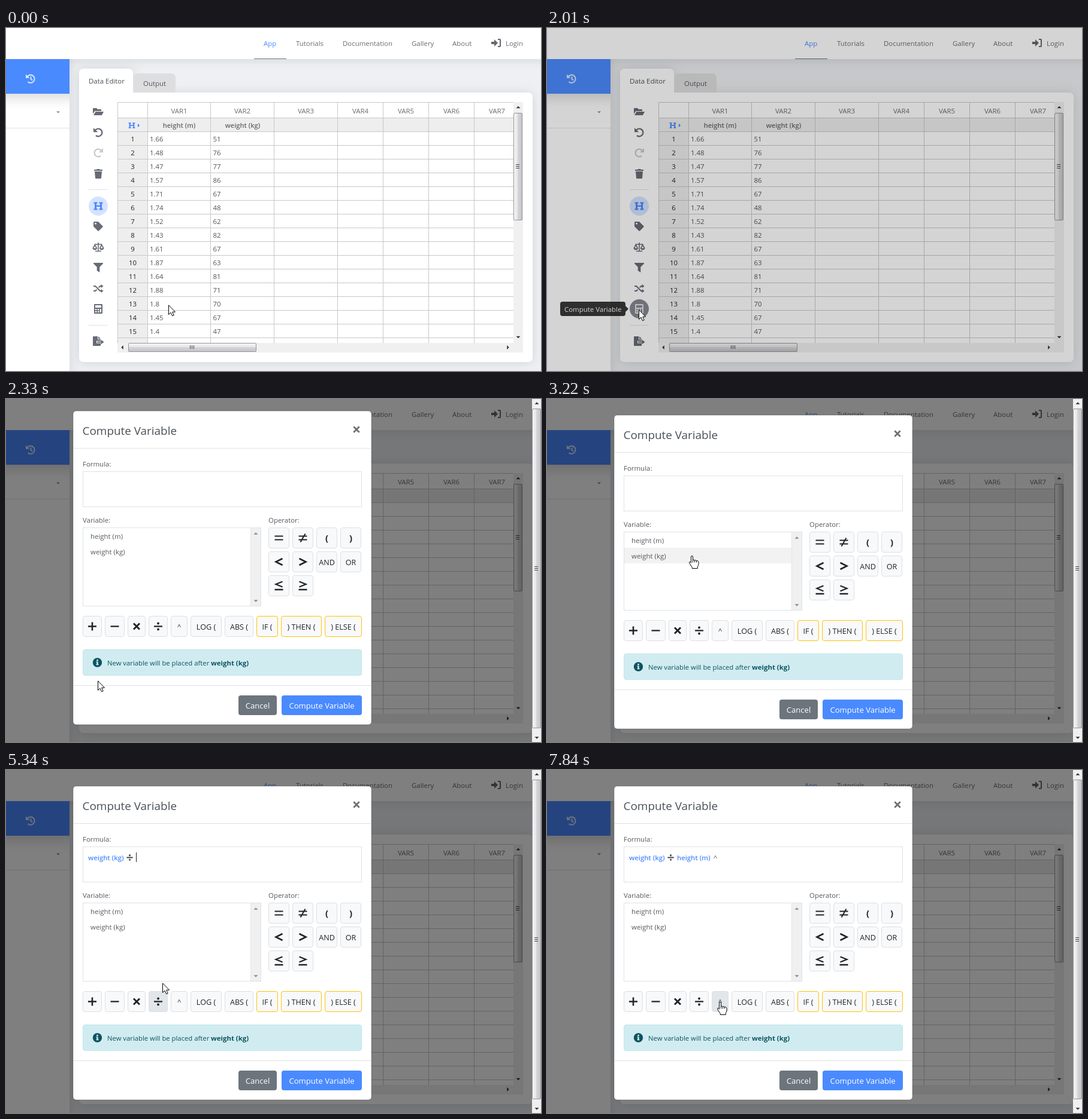
Animation of 893x574 px, one loop 8000 ms. Source, as an HTML page:

```html
<!DOCTYPE html>
<html lang="en">
<head>
<meta charset="utf-8">
<title>Compute Variable</title>
<style>
html, body { margin: 0; width: 100%; height: 100%; overflow: hidden; background: #eef0f2; }
svg { display: block; width: 100%; height: 100%; }
text { font-family: "Open Sans", "Noto Sans", sans-serif; font-size: 11.45px; white-space: pre; }
.crisp { shape-rendering: crispEdges; }
.soft { filter: drop-shadow(0 1px 9px rgba(30, 40, 60, .13)); }

/* 8 s loop: 1% = 80 ms */
.a { animation: 8s step-end infinite; }
#cursor { animation-name: move; }
#hand { animation-name: hand; }
#arrow { animation-name: arrow; }
#click { animation-name: click; }
#tip { animation-name: tip; }
#calc { animation-name: calc; }
#shade { animation-name: shade; }
#modal { animation-name: show; }
#dialog { animation-name: drop; }
#caret { animation-name: caret; }
#tok0 { animation-name: tok0; }
#tok1 { animation-name: tok1; }
#tok2 { animation-name: tok2; }
#tok3 { animation-name: tok3; }
#item0 { animation-name: item0; }
#item1 { animation-name: item1; }
#hovDiv { animation-name: hovDiv; }
#hovPow { animation-name: hovPow; }
#ringDiv { animation-name: ringDiv; }
#ringPow { animation-name: ringPow; }

@keyframes move {
  0% { transform: translate(271px, 463px); }
  6.5% { transform: translate(271px, 463px); animation-timing-function: steps(6, start); }
  12.6% { transform: translate(153px, 471px); }
  34.375% { transform: translate(153px, 471px); animation-timing-function: steps(7, start); }
  41.2% { transform: translate(242px, 262px); }
  52% { transform: translate(242px, 262px); animation-timing-function: steps(7, start); }
  59% { transform: translate(252px, 385px); }
  66.75% { transform: translate(261px, 356px); animation-timing-function: steps(5, end); }
  71.875% { transform: translate(269px, 237px); }
  82.25% { transform: translate(269px, 237px); animation-timing-function: steps(8, start); }
  90.25%, 100% { transform: translate(289px, 388px); }
}
@keyframes hand {
  0%, 25.125%, 52%, 66.75%, 82.25% { opacity: 0; }
  11.6%, 40.25%, 58%, 74.5%, 89.25%, 100% { opacity: 1; }
}
@keyframes arrow {
  0%, 25.125%, 52%, 66.75%, 82.25% { opacity: 1; }
  11.6%, 40.25%, 58%, 74.5%, 89.25%, 100% { opacity: 0; }
}
@keyframes click {
  0%, 24%, 48%, 63.75%, 78%, 92.125%, 100% { opacity: 0; }
  22.125%, 46.125%, 61.75%, 76.375%, 91.375% { opacity: .47; }
}
@keyframes tip {
  0% { opacity: 0; } 12.6% { opacity: .5; } 13.625% { opacity: 1; }
  25.125% { opacity: .78; } 26.125% { opacity: .3; } 27.125%, 100% { opacity: 0; }
}
@keyframes calc {
  0% { opacity: 0; } 11.6% { opacity: .5; } 12.6% { opacity: 1; }
  25.125% { opacity: .8; } 26.125% { opacity: .35; } 27.125%, 100% { opacity: 0; }
}
@keyframes shade {
  0% { opacity: 0; } 24% { opacity: .03; } 25.125% { opacity: .17; }
  26.125% { opacity: .34; } 27.125%, 100% { opacity: .5; }
}
@keyframes show {
  0% { opacity: 0; } 27.125% { opacity: .26; } 28.125% { opacity: .83; } 29.125%, 100% { opacity: 1; }
}
@keyframes drop {
  0% { transform: translateY(-50px); } 27.125% { transform: translateY(-38px); }
  28.125% { transform: translateY(-19px); } 29.125% { transform: translateY(-7px); }
  30.25%, 100% { transform: translateY(0); }
}
@keyframes caret {
  0% { opacity: 0; transform: translateX(137px); }
  33.625% { opacity: 1; transform: translateX(137px); }
  40.25% { opacity: 0; transform: translateX(137px); }
  46.5% { opacity: 1; transform: translateX(137px); }
  48% { opacity: 1; transform: translateX(202px); }
  54.6% { opacity: 0; transform: translateX(202px); }
  61.75% { opacity: 1; transform: translateX(202px); }
  64.625% { opacity: 1; transform: translateX(217px); }
  71.25% { opacity: 0; transform: translateX(217px); }
  78% { opacity: 1; transform: translateX(217px); }
  78.5% { opacity: 1; transform: translateX(277px); }
  85.1% { opacity: 0; transform: translateX(277px); }
  91.375% { opacity: 1; transform: translateX(277px); }
  92.125% { opacity: 1; transform: translateX(290px); }
  98%, 100% { opacity: 0; transform: translateX(290px); }
}
@keyframes tok0 { 0% { opacity: 0; } 48%, 100% { opacity: 1; } }
@keyframes tok1 { 0% { opacity: 0; } 64.625%, 100% { opacity: 1; } }
@keyframes tok2 { 0% { opacity: 0; } 78.5%, 100% { opacity: 1; } }
@keyframes tok3 { 0% { opacity: 0; } 92.125%, 100% { opacity: 1; } }
@keyframes item0 { 0%, 83.25%, 100% { opacity: 0; } 70.8% { opacity: 1; } }
@keyframes item1 { 0%, 53%, 100% { opacity: 0; } 40.25% { opacity: 1; } }
@keyframes hovDiv { 0%, 68.8%, 100% { opacity: 0; } 58% { opacity: 1; } 67.8% { opacity: .45; } }
@keyframes hovPow { 0% { opacity: 0; } 89.25% { opacity: .5; } 90.25%, 100% { opacity: 1; } }
@keyframes ringDiv { 0%, 64.625%, 100% { opacity: 0; } 63.75% { opacity: 1; } }
@keyframes ringPow { 0%, 92.125%, 100% { opacity: 0; } 91.375% { opacity: 1; } }
</style>
</head>
<body>
<svg id="stage" viewBox="0 0 893 574">
  <defs>
    <linearGradient id="barV"><stop offset="0" stop-color="#f6f6f6"/><stop offset=".45" stop-color="#e6e6e8"/><stop offset=".5" stop-color="#d6d6d9"/><stop offset="1" stop-color="#c4c4c8"/></linearGradient>
    <linearGradient id="barH" x2="0" y2="1"><stop offset="0" stop-color="#f6f6f6"/><stop offset=".45" stop-color="#e6e6e8"/><stop offset=".5" stop-color="#d6d6d9"/><stop offset="1" stop-color="#c4c4c8"/></linearGradient>
    <clipPath id="grid"><path d="M186 124H847V527H186Z"/></clipPath>
    <clipPath id="side"><path d="M0 52H106V574H0Z"/></clipPath>
  </defs>
</svg>
<script>
const BLUE = '#4a8aff', INK = '#212529', GRAY = '#676b76', LINE = '#dee2e6';

const rect = (x, y, w, h, fill, extra = '') =>
  `<rect x="${x}" y="${y}" width="${w}" height="${h}" fill="${fill}" ${extra}/>`;
const block = (x, y, w, h, fill) => rect(x, y, w, h, fill, 'class="crisp"');
const box = (x, y, w, h, r, fill, stroke, extra = '') =>
  rect(x + .5, y + .5, w - 1, h - 1, fill, `rx="${r}" stroke="${stroke}" ${extra}`);
const text = (x, y, s, fill, extra = '') => `<text x="${x}" y="${y}" fill="${fill}" ${extra}>${s}</text>`;
const mid = (x, y, s, fill, extra = '') => text(x, y, s, fill, 'text-anchor="middle" ' + extra);
const fillPath = (d, fill) => `<path d="${d}" fill="${fill}" fill-rule="evenodd"/>`;
const line = (d, stroke, w = 2) => `<path d="${d}" fill="none" stroke="${stroke}" stroke-width="${w}"/>`;
const at = (x, y, body, scale = 1) => `<g transform="translate(${x} ${y}) scale(${scale})">${body}</g>`;
const anim = (id, body) => `<g id="${id}" class="a">${body}</g>`;
const size = n => `style="font-size:${n}px"`;
const bold = (n, w = 600) => `style="font-size:${n}px;font-weight:${w}"`;

// Icons, centred on 0,0
const icon = {
  folder: c => fillPath('M-9 4V-5q0-1 1-1h5l2 2h5q1 0 1 1v2H-4.500Q-6-1-6.500 0ZM-4.500 0H9L6.500 5Q6 6 5 6H-8Z', c),
  undo: c => line('M-5.600-3.200A6.400 6.400 0 1 1-4 5', c, 2.300) + fillPath('M-8-8v7.300h7.300z', c),
  trash: c => fillPath('M-7-7h4l1-1h4l1 1h4v2H-7zM-6-4H6L5 7q0 1-1 1h-8q-1 0-1-1z', c),
  head: c => fillPath('M-7.500-6.500h6v2.200h-1.500v3h6v-3h-1.500v-2.200h6v2.200h-1.500v8.600h1.500v2.200h-6v-2.200h1.500v-3.200h-6v3.200h1.500v2.200h-6v-2.200h1.500v-8.600h-1.500z', c),
  tag: c => fillPath('M-8-.5V-6.500Q-8-8-6.500-8H-1Q0-8 .7-7.300L7.400-.6Q8 .3 7.400 1L1 7.400Q.2 8 -.6 7.400L-7.400 .7Q-8 0-8-.5ZM-6-4.700a1.500 1.500 0 1 0 3 0a1.500 1.500 0 1 0-3 0Z', c),
  scale: c => line('M0-8V6M-5 6.500H5M-6.500-5H6.500M-9 2l3.300-6 3.300 6M2.400 2l3.300-6 3.300 6', c, 1.600) +
    fillPath('M-9.500 1.500h7.600q-.6 3-3.800 3t-3.800-3zM1.900 1.500h7.600q-.6 3-3.800 3t-3.800-3z', c),
  filter: c => fillPath('M-7.500-8h15q1 .3 .5 1.200L2.300-1V8L-2.300 5V-1L-8-6.800q-.5-.9 .5-1.200z', c),
  shuffle: c => line('M-8-4h3.200L3 4h2.500M-8 4h3.200l2.300-2.300M.6-1.600L3-4h2.500', c) +
    fillPath('M4.500-7.300L8.500-4 4.500-.7zM4.500 .7L8.500 4 4.500 7.300z', c),
  calc: c => fillPath('M-6-8H6Q7-8 7-7V7Q7 8 6 8H-6Q-7 8-7 7V-7Q-7-8-6-8ZM-5-6v4H5v-4ZM-5 0v2.300h2.300V0ZM-1.200 0v2.300h2.400V0ZM2.700 0v6H5V0ZM-5 3.700V6h2.300V3.700ZM-1.200 3.700V6h2.400V3.700Z', c),
  file: c => fillPath('M-8-8h7v5h5v2.500h-7v4h7V7q0 1-1 1h-11q-1 0-1-1V-7q0-1 1-1zM0-8L4-4H0zM-2 .5h6.500v-3L9.500 1.500l-5 4v-3H-2z', c),
  login: c => fillPath('M-8-2h5v-4l6 6-6 6v-4h-5z', c) + line('M3-6h3q1 0 1 1V5q0 1-1 1H3', c),
  history: c => line('M-5.800-3A6.600 6.600 0 1 1-4.500 5M.5-3.800V.6l2.800 2', c, 1.900) + fillPath('M-8-7.500v6.300h6.300z', c),
};

// Operator signs
const sign = {
  plus: line('M-7 0H7M0-7V7', INK, 2.600),
  minus: line('M-7 0H7', INK, 2.300),
  times: line('M-5-5L5 5M5-5L-5 5', INK, 3),
  div: line('M-7 0H7', INK, 2.300) + `<circle cy="-5" r="1.900" fill="${INK}"/><circle cy="5" r="1.900" fill="${INK}"/>`,
  eq: line('M-7-3H7M-7 3H7', INK),
  ne: line('M-7-3H7M-7 3H7M4-7L-4 7', INK),
  lt: line('M6-5.500L-5 0 6 5.500', INK, 2.600),
  gt: line('M-6-5.500L5 0-6 5.500', INK, 2.600),
  le: line('M6-7L-5-2.500 6 2M-7 6.500H7', INK, 2.300),
  ge: line('M-6-7L5-2.500-6 2M-7 6.500H7', INK, 2.300),
};

const tri = (x, y, turn, fill, s = 3.500) =>
  `<path transform="translate(${x} ${y}) rotate(${turn})" d="M${-s} ${s / 2}H${s}L0 ${-s / 2}Z" fill="${fill}"/>`;
const barV = (x, y, h, top, len, up, down) =>
  block(x, y, 16, h, '#f0f0f0') + box(x, top, 15, len, 1.500, 'url(#barV)', '#97979b') +
  [-3, 0, 3].map(d => block(x + 4, Math.round(top + len / 2 + d) - 1, 6, 1, '#444')).join('') +
  tri(x + 8, up, 0, '#333') + tri(x + 8, down, 180, '#333');

function page() {
  let s = rect(0, 0, 893, 574, '#eef0f2');
  s += rect(-20, 40, 126, 560, '#fff', 'class="soft"');
  s += `<g clip-path="url(#side)">${rect(-20, 52, 146, 58, BLUE, 'style="filter:drop-shadow(0 6px 11px rgba(0,0,0,.16))"')}</g>`;
  s += rect(-20, -20, 933, 72, '#fff', 'class="soft"');
  s += rect(0, 52, 106, 58, BLUE) + at(41, 85, icon.history('#d8ecff'));
  s += tri(87, 141, 180, '#868b91', 3) + block(0, 167, 106, 1, LINE);

  s += text(430, 30, 'App', BLUE) + block(414, 51, 54, 1, '#6c757d');
  [[484, 'Tutorials'], [562, 'Documentation'], [677, 'Gallery'], [745, 'About'], [834, 'Login']]
    .forEach(([x, t]) => s += text(x, 30, t, '#6b6b75'));
  s += at(818, 25, icon.login('#6b6370'));

  s += `<path class="soft" d="M122 108V76q0-8 8-8h74q8 0 8 8v32H871q8 0 8 8V551q0 8-8 8H130q-8 0-8-8Z" fill="#fff"/>`;
  s += fillPath('M213 108V84q0-8 8-8h54q8 0 8 8v24Z', '#dedee0');
  s += text(138, 93, 'Data Editor', '#495057') + text(229, 97, 'Output', '#55585f');

  s += `<circle cx="154" cy="298" r="16" fill="#d5e3ff"/>`;
  [['folder', 140], ['undo', 175], ['trash', 244], ['tag', 332], ['scale', 367], ['filter', 401],
   ['shuffle', 436], ['calc', 470], ['file', 524]].forEach(([k, y]) => s += at(154, y, icon[k](GRAY)));
  s += at(154, 209, icon.undo('#c8cacd'), '-1 1') + at(154, 298, icon.head(BLUE));
  s += block(138, 270, 32, 1, LINE) + block(138, 497, 32, 1, LINE);
  return s + table();
}

function table() {
  const cols = [186, 236, 341, 447, 553, 629, 705, 781, 857];
  const heights = [1.66, 1.48, 1.47, 1.57, 1.71, 1.74, 1.52, 1.43, 1.61, 1.87, 1.64, 1.88, 1.8, 1.45, 1.4];
  const weights = [51, 76, 77, 86, 67, 48, 62, 82, 67, 63, 81, 71, 70, 67, 47];
  let s = block(186, 124, 661, 403, '#fff') + block(186, 150, 661, 23, '#eee') + block(186, 173, 50, 354, '#eee');
  [124, 150].forEach(y => s += block(186, y, 661, 1, '#c8c8c8'));
  for (let y = 173; y < 527; y += 23) s += block(186, y, 661, 1, '#c8c8c8');
  cols.forEach((x, i) => {
    s += block(x, 124, 1, 403, '#c8c8c8');
    if (i && i < 8) s += mid((x + cols[i + 1]) / 2 + .5, 143, 'VAR' + i, '#6b6b70');
  });
  s += at(210, 163, icon.head(BLUE), .73) + tri(221.500, 163, 90, BLUE, 3.200);
  s += mid(289, 167, 'height (m)', '#666', bold(11.1)) + mid(395, 167, 'weight (kg)', '#666', bold(11.1));
  heights.forEach((h, i) => {
    const y = 190 + 23 * i;
    s += mid(211.500, y, i + 1, '#222') + text(240, y, h, '#555') + text(345.500, y, weights[i], '#555');
  });
  s = `<g clip-path="url(#grid)">${s}</g>`;
  s += block(186, 527, 677, 16, '#f0f0f0') + box(204, 527, 214, 15, 1.500, 'url(#barH)', '#97979b');
  [-3, 0, 3].forEach(d => s += block(310 + d, 531, 1, 6, '#444'));
  s += tri(194, 534.500, -90, '#333') + tri(838, 534.500, 90, '#333');
  return s + barV(847, 124, 403, 142, 180, 132.500, 517.500);
}

function hoverButton() {
  const tip = fillPath('M26 458H127q4 0 4 4v3l5 5-5 5v3q0 4-4 4H26q-4 0-4-4V462q0-4 4-4Z', '#000') +
    text(29, 474.500, 'Compute Variable', '#fff');
  return anim('calc', `<circle cx="154" cy="470" r="16" fill="#676b76"/>` + at(154, 470, icon.calc('#fff'))) + anim('tip', tip);
}

function button(x, y, w, face, border = '#dcdfe3') {
  const c = x + w / 2;
  return box(x, y, w, 35, 3.500, '#f8f9fa', border) +
    (face[0] === '<' ? at(c, y + 17.500, face) : mid(c, y + 23, face, INK, size(12.6)));
}

function dialog() {
  let s = rect(112, 27, 498, 525, '#fff', 'rx="5" stroke="#000" stroke-opacity=".25"');
  s += text(127.500, 67, 'Compute Variable', '#495057', size(18.9));
  s += at(585, 58, line('M-4.700-4.700L4.700 4.700M4.700-4.700L-4.700 4.700', '#707070', 2.800));
  s += block(112, 89, 498, 1, LINE) + block(112, 486, 498, 1, LINE);

  s += text(128, 120, 'Formula:', '#55595f') + box(128, 128, 466, 60, 0, '#fff', LINE);
  s += anim('tok0', text(137, 151, 'weight (kg)', BLUE, bold(11.3)));
  s += anim('tok1', at(206.500, 146.500, sign.div, .74));
  s += anim('tok2', text(217, 151, 'height (m)', BLUE, bold(11.3)));
  s += anim('tok3', text(278, 151, '^', '#555'));
  s += anim('caret', block(0, 138, 1, 16, '#222'));

  s += text(128, 214, 'Variable:', '#55595f') + box(128, 222, 298, 132, 0, '#fff', LINE);
  s += anim('item0', block(129, 223, 279, 26, '#f2f2f2')) + anim('item1', block(129, 249, 279, 26, '#f2f2f2'));
  s += text(141, 241, 'height (m)', '#55595f') + text(141, 267, 'weight (kg)', '#55595f');
  s += block(409, 223, 16, 130, '#f0f0f0') + block(408, 223, 1, 130, '#e6e6e6');
  s += tri(417, 232, 0, '#8a8a8a') + tri(417, 345, 180, '#8a8a8a');

  s += text(438, 214, 'Operator:', '#55595f');
  const paren = p => mid(0, 5, p, INK, bold(15, 700)).replace('<text', '<text ');
  [sign.eq, sign.ne, paren('('), paren(')'), sign.lt, sign.gt, 'AND', 'OR', sign.le, sign.ge]
    .forEach((f, i) => s += button(438 + 40 * (i % 4), 222 + 40 * (i >> 2), 35, f));

  const ring = (x, w) => rect(x - 1.500, 368.500, w + 3, 38, 'none', 'rx="5" stroke="#d8d9db" stroke-opacity=".6" stroke-width="3"');
  const hover = (x, w) => box(x, 370, w, 35, 3.500, '#e2e6ea', '#dae0e5');
  s += button(128, 370, 32, sign.plus) + button(165, 370, 33, sign.minus) + button(203, 370, 30, sign.times);
  s += button(238, 370, 32, '') + anim('hovDiv', hover(238, 32)) + anim('ringDiv', ring(238, 32)) + at(254, 387.500, sign.div);
  s += button(275, 370, 28, '') + anim('hovPow', hover(275, 28)) + anim('ringPow', ring(275, 28)) + mid(289, 392, '^', INK);
  s += button(308, 370, 52, 'LOG (') + button(365, 370, 48, 'ABS (');
  s += button(418, 370, 36, 'IF (', '#ffc107') + button(459, 370, 68, ') THEN (', '#ffc107') + button(532, 370, 62, ') ELSE (', '#ffc107');

  s += box(128, 426, 466, 44, 3.500, '#d1ecf1', '#bee5eb') + `<circle cx="152.500" cy="448" r="7.700" fill="#0c5460"/>`;
  s += at(152.500, 448, fillPath('M-1.300-5h2.600v2.400h-2.600zM-2-1.400H1.200V2.800H2V4.300H-2V2.800H-1.200V0H-2Z', '#d1ecf1'));
  s += text(169, 453, 'New variable will be placed after', '#0c5460', size(11.3)) + text(342, 453, 'weight (kg)', '#0c5460', bold(11.4, 700));

  s += rect(388, 503, 64, 33, '#6c757d', 'rx="4"') + rect(460, 503, 134, 33, BLUE, 'rx="4"');
  return s + mid(420, 525, 'Cancel', '#fff', size(13.1)) + mid(527, 525, 'Compute Variable', '#fff', size(13.1));
}

function cursor() {
  const look = 'fill="#fff" stroke="#000" stroke-linejoin="round"';
  const arrow = `<path d="M.5 .8V16.500L4 13.200 6.600 18.800 9.200 17.700 6.700 12.200H11.500Z" ${look}/>`;
  const hand = `<path d="M-1.500 2a1.500 1.500 0 0 1 3 0V7.500q1.700-1 3 .5 1.700-.8 3 .7 1.800-.6 3 .8 .9 1.300 .5 4.500-.3 3-1.700 4.800V21.500H.2V19.500Q-2.500 16-4.300 12.500q-.8-1.800 .5-2.200 1.100-.1 2.300 1.900Z" ${look}/>` +
    line('M1.500 7.500V11.500M4.500 8V11.500M7.500 8.700V11.500', '#000', 1);
  return anim('cursor', anim('click', '<circle r="12" fill="#ff0"/>') + anim('arrow', arrow) + anim('hand', hand));
}

document.getElementById('stage').insertAdjacentHTML('beforeend',
  page() + hoverButton() + anim('shade', rect(0, 0, 893, 574, '#000')) +
  anim('modal', anim('dialog', dialog()) + barV(878, 0, 574, 16, 535, 7, 567)) + cursor());
</script>
</body>
</html>
```
